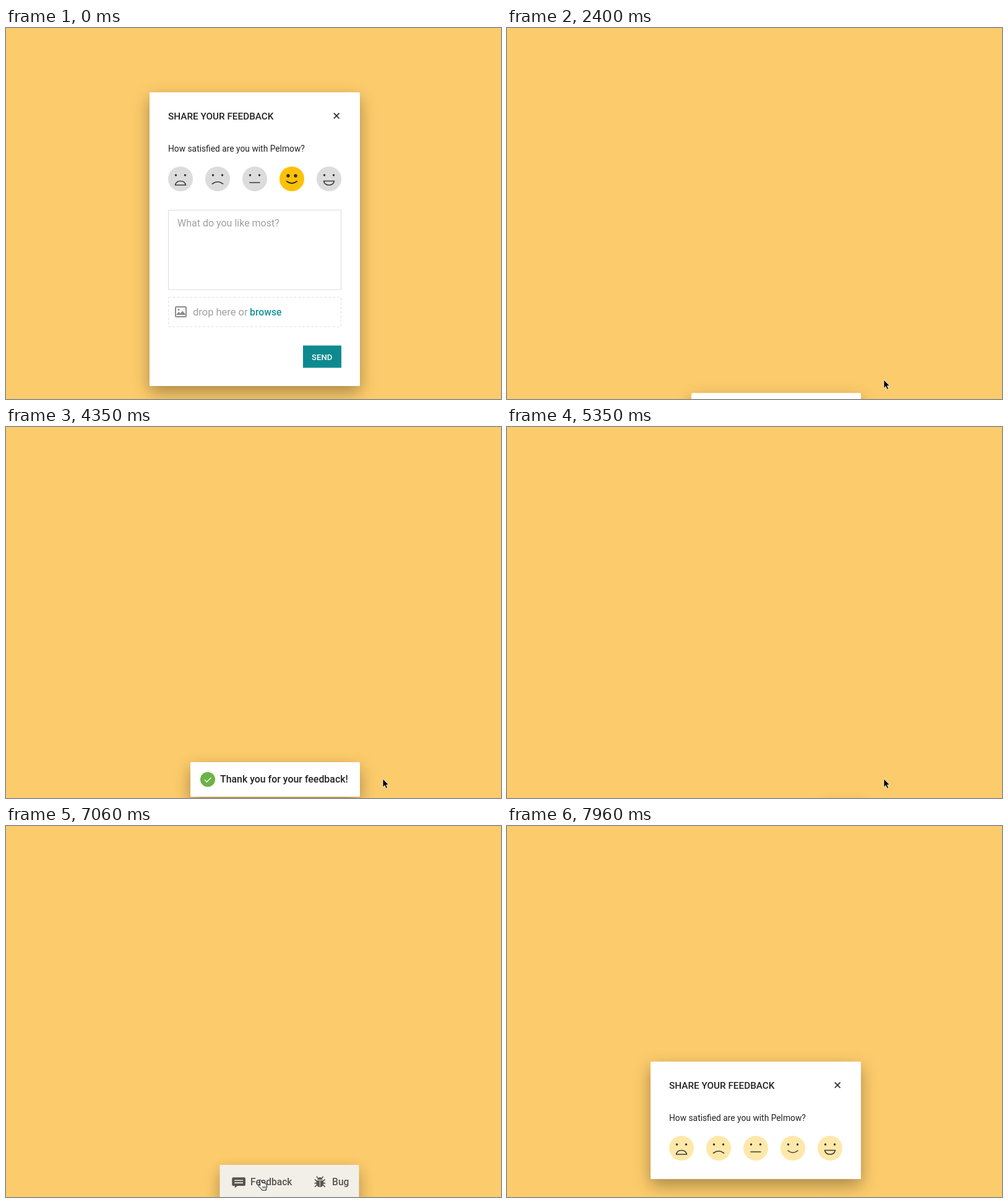
Write an HTML page that moves like this. It is 800 px wide and 600 px high and loops after 8 s.

```html
<!DOCTYPE html>
<html lang="en">
<head>
<meta charset="utf-8">
<title>Feedback widget</title>
<style>
  html, body { margin: 0; width: 100%; height: 100%; overflow: hidden; background: #fccb6b; }
  svg { display: block; width: 100vw; height: 100vh; font-family: Roboto, "Noto Sans", sans-serif; }
  .medium { font-weight: 500; }
  .shadow { filter: url(#shadow); }
  .line { fill: none; stroke: #3c3c3c; stroke-width: 1.6; stroke-linecap: round; stroke-linejoin: round; }
  .chosen .line { stroke: #2b2b2b; stroke-width: 2.1; }
</style>
</head>
<body>
<svg viewBox="0 0 800 600" xmlns="http://www.w3.org/2000/svg">
  <defs>
    <filter id="shadow" x="-50%" y="-100%" width="200%" height="300%" color-interpolation-filters="sRGB">
      <feDropShadow dx="0" dy="10" stdDeviation="13" flood-color="#000" flood-opacity=".32"/>
    </filter>
  </defs>
  <rect width="800" height="600" fill="#fccb6b"/>

  <g id="rated"></g>
  <g id="fresh"></g>

  <g id="toast">
    <rect class="shadow" x="298" width="274" height="56" rx="1.5" fill="#fff"/>
    <circle cx="326" cy="28" r="12" fill="#6ab344"/>
    <path d="M321 28.5l3.6 3.6 7-7" fill="none" stroke="#fff" stroke-width="1.4"/>
    <text class="medium" x="346" y="33.3" font-size="15.9" fill="#222">Thank you for your feedback!</text>
  </g>

  <g id="panel">
    <rect id="panelBox" class="shadow" y="546" height="60" rx="1.5" fill="#f2f2f2"/>
    <g id="mail">
      <path d="M530 570.5L544 562l14 8.5v15q0 1.5-1.5 1.5h-25q-1.5 0-1.5-1.5z" fill="#6f6f6f"/>
      <path d="M531 571.3l5.5-2.8h15l5.5 2.8-13 8.2z" fill="#f2f2f2"/>
      <path d="M538.5 570.5h11M538.5 573h11M540.5 575.3h7" stroke="#777" stroke-width="1.1"/>
    </g>
    <g id="labels" fill="#4c4c4c">
      <path d="M366 566.5h18q2 0 2 2v10q0 2-2 2h-11l-4.500 3.500v-3.500h-2.500q-2 0-2-2v-10q0-2 2-2z"/>
      <path d="M368 571.5h14M368 575.5h14" stroke="#f2f2f2" stroke-width="1.6"/>
      <text class="medium" x="394.2" y="579.6" font-size="15.8">Feedback</text>
      <path d="M502.5 571.5h11q1 4 0 7-1.500 4-5.500 4t-5.500-4q-1-3 0-7zM504 570.3q0-3.800 4-3.800t4 3.800z"/>
      <path d="M504.5 567.5l-2-2.500M511.5 567.5l2-2.500M503 572.5l-3.500-2.500M513 572.5l3.500-2.500M499 576h18M503 579l-3.500 3M513 579l3.500 3" fill="none" stroke="#4c4c4c" stroke-width="1.7"/>
      <path d="M508 572v10" stroke="#f2f2f2"/>
      <text class="medium" x="528" y="579.6" font-size="15.8">Bug</text>
    </g>
  </g>

  <g id="arrow">
    <path d="M0 0V13.600L3.100 10.700 5.200 15.400 7.600 14.400 5.500 9.800H9.500z" fill="#000" stroke="#fff" stroke-width=".8"/>
  </g>
  <g id="hand">
    <path d="M-1 .8q1.500-1.600 2.500.3l1.500 4q1.600-1 2.500.6 1.700-.8 2.400.8 1.900-.4 2.200 1.500l.5 4-1.200 2.500v2.500H2.500L1.700 15l-4.500-4.500q-1.500-2 .2-2.400 1.200 0 2.300 1.500z" fill="#fff" stroke="#000" stroke-linejoin="round"/>
    <path d="M4 10.500v3.500M6 10.500v3.500M8 10.500v3.500" stroke="#000" stroke-width=".8"/>
  </g>
</svg>

<script>
const LOOP = 8000, STEP = 50;
const $ = id => document.getElementById(id);

// Mouths, relative to the face centre
const MOUTHS = [
  'M-8.5 10Q-7 3.5 0 3.5T8.5 10Z',
  'M-8.5 8Q0 1.5 8.5 8',
  'M-8 6H8',
  'M-8 4Q0 10.5 8 4',
  'M-8.5 3.5H8.5Q7 10 0 10T-8.5 3.5Z'
];

function face(i, fill, chosen) {
  const dx = chosen ? 6 : 7.5, r = chosen ? 2.7 : 1.7;
  const eye = x => `<circle cx="${x}" cy="${chosen ? -5 : -6}" r="${r}" fill="#2b2b2b"/>`;
  return `<g class="${chosen ? 'chosen' : ''}" transform="translate(${282 + 60 * i} 140)">
    <circle r="20" fill="${chosen ? '#fec109' : fill}"/>${eye(-dx)}${eye(dx)}
    <path class="line" d="${MOUTHS[i]}"/></g>`;
}

function card(height, fill, chosen) {
  return `<rect class="shadow" x="232" width="340" height="${height}" rx="1.5" fill="#fff"/>
    <text class="medium" x="262" y="44" font-size="15.3" fill="#222">SHARE YOUR FEEDBACK</text>
    <path d="M529.8 33.7l8.8 8.8m0-8.800l-8.800 8.800" stroke="#222" stroke-width="1.7"/>
    <text x="262" y="96" font-size="13.8" fill="#222">How satisfied are you with Pelmow?</text>`
    + MOUTHS.map((_, i) => face(i, fill, i === chosen)).join('');
}

const form = `
  <rect x="262.5" y="190.5" width="279" height="128.5" fill="#fff" stroke="#dcdcdc"/>
  <text x="277" y="216.7" font-size="16" fill="#a0a0a0">What do you like most?</text>
  <rect x="262.5" y="331.5" width="279" height="47.5" fill="#fff" stroke="#dedede" stroke-dasharray="4 3"/>
  <rect x="274" y="347" width="17" height="16" rx="1.5" fill="none" stroke="#8c8c8c" stroke-width="2"/>
  <path d="M275.5 359l3.8-4 2.5 2.5 3.5-4 4.7 5.5v1h-14.5z" fill="#8c8c8c"/>
  <circle cx="279" cy="351.5" r="1.5" fill="#8c8c8c"/>
  <text x="302" y="360.7" font-size="16.5" fill="#a0a0a0">drop here or</text>
  <text class="medium" x="394" y="360.7" font-size="15.8" fill="#17949a">browse</text>
  <rect x="480" y="409.5" width="62" height="36" fill="#0d8a90"/>
  <text class="medium" x="494" y="432.6" font-size="13.2" fill="#fff">SEND</text>`;

$('rated').innerHTML = card(475, '#dcdcdc', 3) + form;
$('fresh').innerHTML = card(190, '#fee8a9', -1);

const sine = p => (1 - Math.cos(Math.PI * p)) / 2;
const outQuad = p => 1 - (1 - p) ** 2;
const outCubic = p => 1 - (1 - p) ** 3;
const span = (t, start, length, ease = sine) =>
  ease(Math.min(1, Math.max(0, (t - start) / length)));
const mix = (a, b, p) => a + (b - a) * p;

function show(id, on) { $(id).style.display = on ? '' : 'none'; }
function move(id, x, y) { $(id).setAttribute('transform', `translate(${x} ${y})`); }

// Pointer legs: start, length, from, to, easing
const LEGS = [
  [480, 620, [521, 600], [520, 528], sine],
  [1310, 440, [520, 528], [609, 569], outQuad],
  [5970, 830, [609, 569], [411, 572], sine],
  [7100, 760, [411, 572], [521, 598], sine]
];

function pointer(t) {
  const [start, length, from, to, ease] = LEGS.filter(leg => t >= leg[0]).pop() || LEGS[0];
  const p = span(t, start, length, ease);
  return [mix(from[0], to[0], p), mix(from[1], to[1], p)];
}

function draw(t) {
  show('rated', t < 1500);
  move('rated', 0, 104 + 526 * span(t, 1300, 160));

  show('toast', t > 2300 && t < 4500);
  move('toast', 0, mix(640, 514, span(t, 2300, 650, outCubic)) + 126 * span(t, 4300, 160));

  // Button rises, widens into a menu, then shrinks away
  const leave = span(t, 7000, 300);
  const lift = mix(80, 0, span(t, 5300, 550, outCubic)) + 25 * leave;
  const left = mix(516, 344, span(t, 6050, 270));
  const swap = span(t, 6180, 220);
  show('panel', t > 5300 && leave < 1);
  $('panel').setAttribute('transform',
    `translate(458 ${572 + lift}) scale(${1 - 0.2 * leave}) translate(-458 -572)`);
  $('panel').setAttribute('opacity', 1 - leave);
  $('panelBox').setAttribute('x', left);
  $('panelBox').setAttribute('width', 572 - left);
  $('mail').setAttribute('opacity', 1 - swap);
  $('labels').setAttribute('opacity', swap);

  show('fresh', t > 7180);
  move('fresh', 0, mix(630, 381, span(t, 7180, 690, outCubic)));

  const [x, y] = pointer(t);
  const overSend = t < 1340 && y < 549;
  const overMenu = t > 6000 && t < 7250 && x < 570;
  const grab = overSend || overMenu;
  show('arrow', t >= 490 && !grab);
  show('hand', t >= 490 && grab);
  move(grab ? 'hand' : 'arrow', x, y);
}

// The picture advances 20 times a second; the small lead absorbs clock rounding
function tick(now) {
  draw(Math.floor((now + 2) / STEP) * STEP % LOOP);
  requestAnimationFrame(tick);
}
draw(0);
requestAnimationFrame(tick);
</script>
</body>
</html>
```
